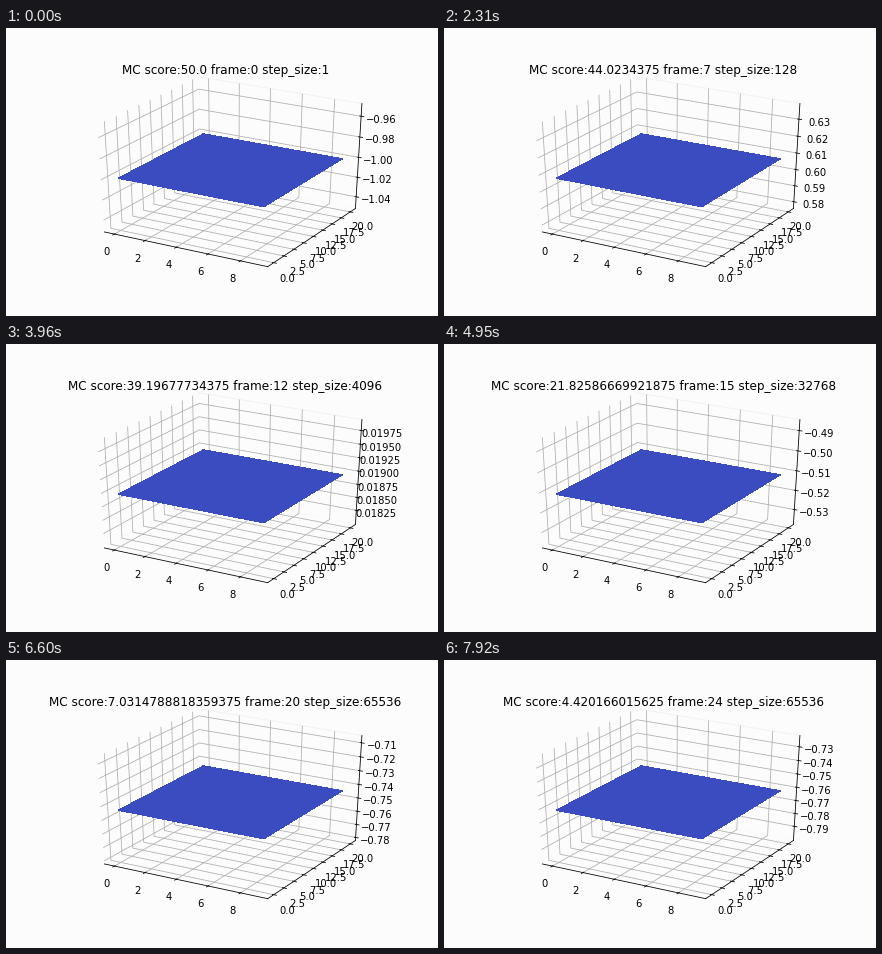
Recreate the animation shown at these times as a matplotlib script. Size 432 px wide and 288 px high, loop 8.25 s.

```python
import numpy as np
import matplotlib.pyplot as plt
from matplotlib.animation import FuncAnimation
from mpl_toolkits.mplot3d import Axes3D

plt.rcParams.update({"font.family": "DejaVu Sans", "font.size": 10})

PAPER, EDGE, BLUE = "#fcfcfc", "#f2f2f2", "#3b4cc0"
MARGIN = 1 / 48  # gap between the axis limits and the panes
COUNT = 25

# turning points of the run: index, score, height of the surface
KEYS = np.array([
    (0, 50, -1), (1, 25, -1), (3, 43.75, -1), (4, 46.875, 1),
    (9, 42.09, 0.3457), (12, 39.1968, 0.01896), (16, 16.0355, -0.688),
    (18, 8.80547, -0.7593), (22, 5.25742, -0.7279), (24, 4.42017, -0.7615),
])


class CubeAxes(Axes3D):
    """Perspective view of an equal-sided box, stretched to the axes."""

    def apply_aspect(self, position=None):
        pass

    def get_proj(self):
        elev, azim, dist = np.radians(30), np.radians(-60), 10
        n = np.array([np.cos(azim) * np.cos(elev),
                      np.sin(azim) * np.cos(elev), np.sin(elev)])
        u = np.cross([0, 0, 1], n)
        u /= np.linalg.norm(u)
        view = np.eye(4)
        view[:3, :3] = u, np.cross(n, u), n
        view[2, 3] = -dist
        lims = np.array([self.get_xlim(), self.get_ylim(), self.get_zlim()])
        scale = (1 + 2 * MARGIN) / (lims[:, 1] - lims[:, 0])
        world = np.diag([*scale, 1])
        world[:3, 3] = -scale * lims.mean(axis=1)
        persp = np.array([[1, 0, 0, 0], [0, 1, 0, 0],
                          [0, 0, 0, -dist], [0, 0, -1, 0]])
        return persp @ view @ world


def padded(lo, hi):
    gap = (hi - lo) * MARGIN
    return lo - gap, hi + gap


def nice_step(span):
    raw = span / 9
    power = 10 ** np.floor(np.log10(raw))
    return next(m * power for m in (1, 2, 2.5, 5, 10) if m * power >= raw)


def z_ticks(z):
    """Tick places in 0..1 and their labels for limits of z +- 5 %."""
    span = 0.1 * abs(z)
    low, step = z - span / 2, nice_step(span)
    first, last = np.ceil(low / step), np.floor((low + span) / step)
    ticks = np.arange(first, last + 1) * step
    digits = len(f"{step:.8f}".rstrip("0").split(".")[1])
    labels = [f"{t:.{digits}f}".replace("-", "\u2212") for t in ticks]
    return (ticks - low) / span, labels


def run_state(i):
    """Step size, score (a mean over that many steps) and height."""
    size = min(2 ** i, 2 ** 16)
    score, z = (np.interp(i, KEYS[:, 0], col) for col in KEYS.T[1:])
    return size, np.round(score * size / 5) * 5 / size, z


fig = plt.figure(figsize=(6, 4), dpi=72, facecolor=PAPER)
ax = CubeAxes(fig, [0.125, 0.125, 0.775, 0.755])
fig.add_axes(ax)
ax.patch.set_visible(False)
for axis in (ax.xaxis, ax.yaxis, ax.zaxis):
    axis.set_pane_color(PAPER)
ax.yaxis.pane.set_edgecolor(EDGE)

X, Y = np.meshgrid([0, 9], [0, 20])
ax.plot_surface(X, Y, np.full(X.shape, 0.5), color=BLUE, shade=False,
                linewidth=0, antialiased=False)
ax.set_xticks(range(0, 9, 2))
ax.set_yticks(np.arange(0, 20.1, 2.5))
ax.set_xlim(*padded(-0.45, 9.45))
ax.set_ylim(*padded(-1, 21))
ax.set_zlim(*padded(0, 1))


def update(i):
    size, score, z = run_state(i)
    ax.set_title(f"MC score:{score} frame:{i} step_size:{size}",
                 x=0.494, y=1)
    ax.set_zticks(*z_ticks(z))


anim = FuncAnimation(fig, update, frames=COUNT, init_func=lambda: None,
                     interval=330, repeat=True, repeat_delay=0)
plt.show()
```
